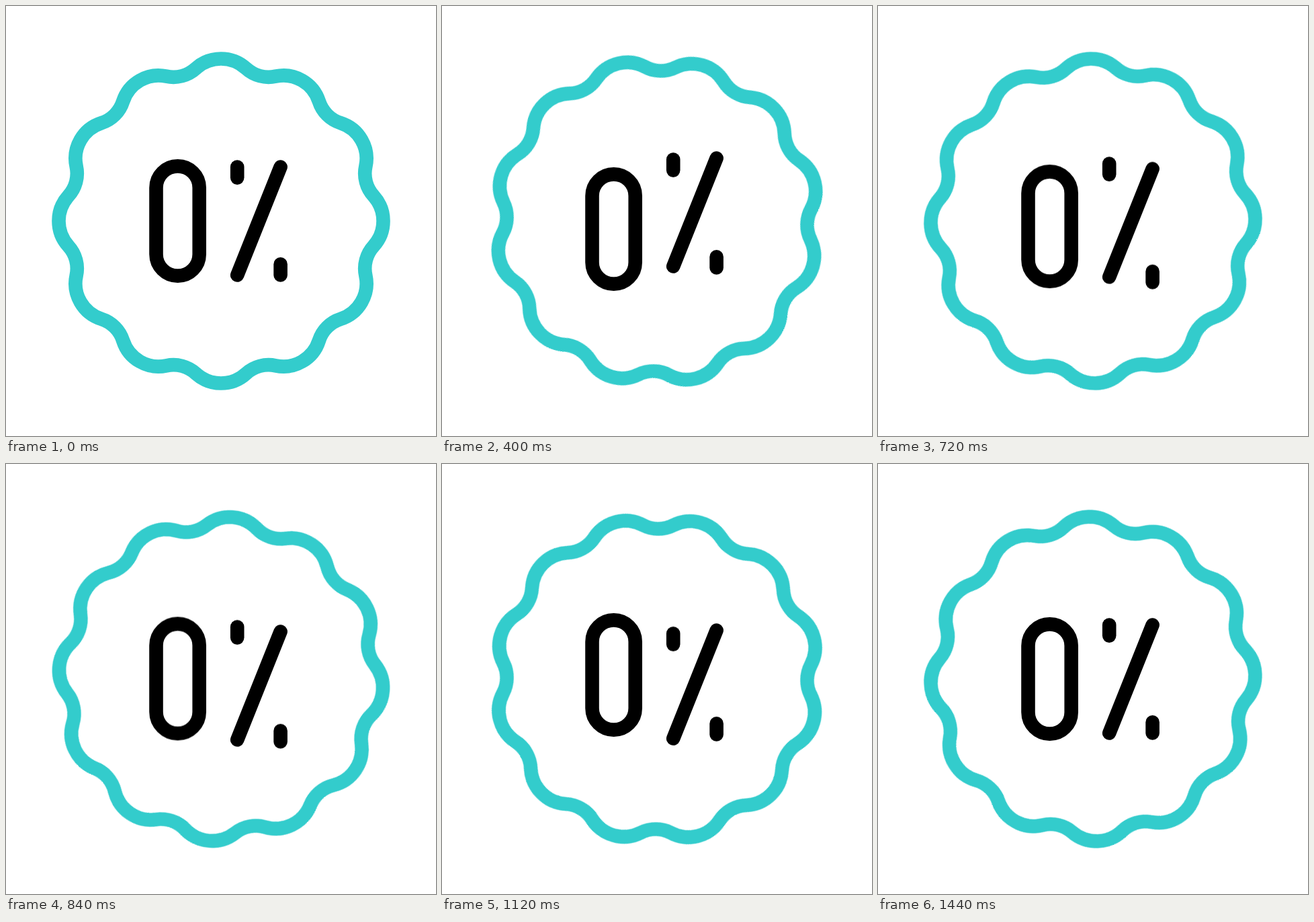
An HTML page that plays this animation: 640 by 640 pixels, repeating every 1.48 s.

```html
<!DOCTYPE html>
<html lang="en">
<head>
<meta charset="utf-8">
<title>Zero percent badge</title>
<style>
  html, body { margin: 0; width: 100%; height: 100%; overflow: hidden; background: #fff; }
  svg { display: block; width: 100%; height: 100%; }
  svg * { fill: none; stroke: #000; stroke-width: 20.6; stroke-linecap: round; }
  #badge { stroke: #3cc; transform-origin: 320px 320px; }
</style>
</head>
<body>
<svg viewBox="0 0 640 640">
  <path id="badge"/>
  <rect id="zero" x="223.5" y="238.4" width="64.2" height="163.2" rx="32.1"/>
  <path id="dotA" d="M344.2 239.5V255.6"/>
  <path id="slash" d="M408.6 239.5L344.2 400.5"/>
  <path id="dotB" d="M408.6 384.4V400.5"/>
</svg>
<script>
const FRAMES = 37, LOOP = 1480, START = 2.2;
const $ = id => document.getElementById(id);

// Scalloped ring: alternating bump and notch arcs that meet at a tangent.
function scallop(count, bumpAt, bumpR, notchAt, notchR) {
  const half = Math.PI / count;
  const k = bumpR / (bumpR + notchR);
  const tx = notchAt * Math.sin(half) * k;
  const ty = bumpAt + (notchAt * Math.cos(half) - bumpAt) * k;
  const r = Math.hypot(tx, ty), spread = Math.atan2(tx, ty);
  const at = a => `${(320 + r * Math.sin(a)).toFixed(2)} ${(320 - r * Math.cos(a)).toFixed(2)}`;
  let d = `M${at(-spread)}`;
  for (let i = 0; i < count; i++) {
    const a = 2 * half * i;
    d += `A${bumpR} ${bumpR} 0 0 1 ${at(a + spread)}`;
    d += `A${notchR} ${notchR} 0 0 0 ${at(a + 2 * half - spread)}`;
  }
  return d + 'Z';
}

const play = (id, frames) => $(id).animate(frames, {
  duration: LOOP, iterations: Infinity, easing: `steps(${FRAMES})`
});

// Moves to the first offset, swings to the second, then settles back.
function bob(id, [t1, y1], [t2, y2], end) {
  const steps = [[0, 0], [START, 0], [t1, y1], [t2, y2], [end, 0], [FRAMES, 0]];
  play(id, steps.map(([t, y]) => ({
    offset: t / FRAMES,
    transform: `translateY(${y}px)`,
    easing: 'cubic-bezier(.333, 0, .667, 1)'
  })));
}

$('badge').setAttribute('d', scallop(12, 186, 55.5, 273.1, 49.6));
play('badge', [{ transform: 'rotate(0deg)' }, { transform: 'rotate(60deg)' }]);

bob('dotB', [7.9, -13], [20.2, 13], 30.6);
bob('slash', [10, -13], [24, 13], 33.5);
bob('dotA', [12.5, -13], [27.3, 13], 36);
bob('zero', [13.5, 15.6], [25.5, -8], 33.2);
</script>
</body>
</html>
```
